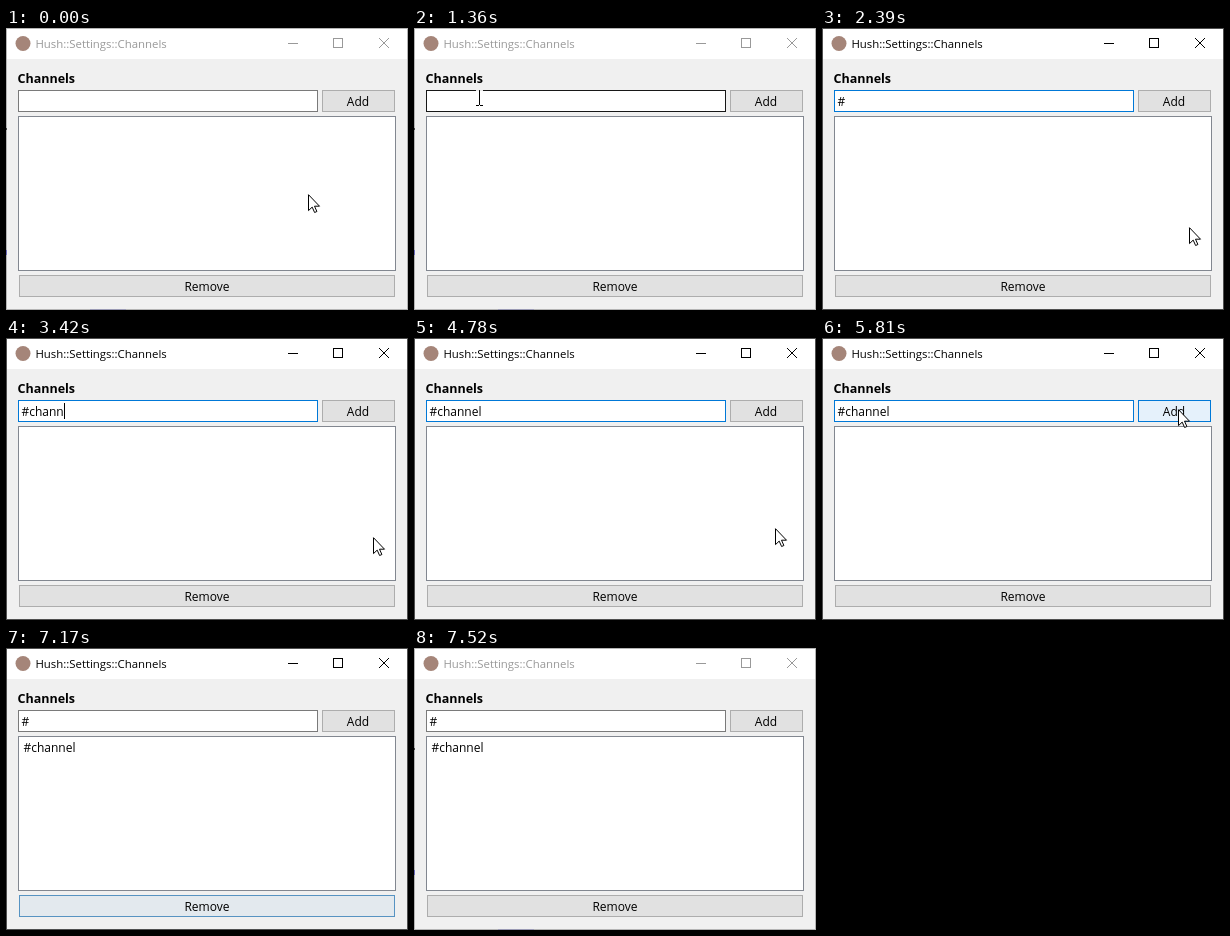
An HTML page for the animation above (7870 ms loop, 402 by 282 pixels).

```html
<!DOCTYPE html>
<html lang="en">
<head>
<meta charset="utf-8">
<title>Channel settings</title>
<style>
  html, body { margin: 0; width: 100%; height: 100%; overflow: hidden; background: #f0f0f0; }
  svg { display: block; isolation: isolate; font: 12px "Open Sans", sans-serif; }
  rect, .glyphs { shape-rendering: crispEdges; }
  .heading { font-size: 12.5px; font-weight: 700; }
  .title { font-size: 11.4px; }
  .center { text-anchor: middle; }
  #beam { mix-blend-mode: difference; fill: #fff; }
</style>
</head>
<body>
<svg width="402" height="282" viewBox="0 0 402 282">
  <rect width="402" height="282" fill="#f0f0f0"/>
  <rect width="402" height="31" fill="#fff"/>
  <rect id="frame" x=".5" y=".5" width="401" height="281" fill="none"/>
  <g id="backdrop">
    <rect y="100" width="1" height="2" fill="#444"/>
    <rect y="222" width="1" height="5" fill="#6a6ab8"/>
    <rect x="84" y="281" width="36" height="1" fill="#9a9ab4"/>
  </g>

  <circle cx="17" cy="15.5" r="7.5" fill="#a58579"/>
  <text id="title" class="title" x="29.4" y="20">Hush::Settings::Channels</text>
  <g id="controls" fill="none">
    <path class="glyphs" d="M282 15.5h10M327.5 10.5h9v9h-9z"/>
    <path d="M373 10l10 10M383 10l-10 10"/>
  </g>

  <text class="heading" x="11.5" y="55">Channels</text>
  <rect id="field" x="12.5" y="62.5" width="299" height="21" fill="#fff"/>
  <text id="entry" x="15.5" y="78"></text>
  <rect id="caret" y="65" width="1" height="16"/>
  <rect id="add" x="316.5" y="62.5" width="72" height="21"/>
  <text class="center" x="352" y="78">Add</text>
  <rect x="12.5" y="88.5" width="377" height="154" fill="#fff" stroke="#828790"/>
  <text id="item" x="17.5" y="104">#channel</text>
  <rect id="remove" x="13.5" y="247.5" width="375" height="21"/>
  <text class="center" x="201" y="263">Remove</text>

  <path id="arrow" d="M.5 .7V16.6L4.2 13.1L6.6 18.5L8.9 17.5L6.5 12.2H11.5Z" fill="#fff" stroke="#000"/>
  <g id="beam">
    <rect x="-3" width="3" height="1"/>
    <rect x="1" width="3" height="1"/>
    <rect y="1" width="1" height="14"/>
    <rect x="-3" y="15" width="3" height="1"/>
    <rect x="1" y="15" width="3" height="1"/>
  </g>
</svg>
<script>
const LOOP = 7870;
const WORD = "#channel";
// Caret position by number of typed characters
const CARET_X = { 1: 24, 3: 37, 6: 58, 7: 65, 8: 68 };

const NORMAL = ["#e1e1e1", "#adadad"];
const FADING = ["#e3e9ee", "#5793c2"];
const HOVER = ["#e5f1fb", "#0078d7"];

// Each step lists only what changes at that time
const steps = [
  [0, { active: false, field: "#7a7a7a", typed: 0, caret: false, item: false,
        add: NORMAL, remove: NORMAL, arrow: [302, 166], beam: null }],
  [680, { arrow: [225, 138] }],
  [1010, { arrow: null, beam: [85, 70], field: "#484848" }],
  [1360, { beam: [65, 62], field: "#171717" }],
  [1690, { active: true, field: "#0b4877", typed: 1, caret: true }],
  [2040, { beam: null, arrow: [350, 188], field: "#0078d7" }],
  [2390, { arrow: [367, 199], caret: false }],
  [2720, { caret: true }],
  [3070, { typed: 3 }],
  [3420, { typed: 6 }],
  [3750, { typed: 7 }],
  [4100, { typed: 8 }],
  [4430, { arrow: [367, 200] }],
  [4780, { arrow: [361, 190], caret: false }],
  [5130, { arrow: [349, 152] }],
  [5460, { arrow: [355, 76], caret: true, add: FADING }],
  [5810, { arrow: [356, 71], caret: false, add: HOVER }],
  [6160, { typed: 1, item: true, field: "#7a7a7a" }],
  [6490, { arrow: [356, 72] }],
  [6840, { arrow: [354, 178], add: NORMAL }],
  [7170, { arrow: null, remove: FADING }],
  [7520, { active: false, remove: NORMAL }],
];

const el = id => document.getElementById(id);
const set = (id, attrs) => {
  for (const name in attrs) el(id).setAttribute(name, attrs[name]);
};
const show = (id, visible) => set(id, { visibility: visible ? "visible" : "hidden" });
const paint = (id, [fill, stroke]) => set(id, { fill, stroke });
const place = (id, point) => {
  show(id, point);
  if (point) set(id, { transform: `translate(${point})` });
};

function draw(time) {
  const past = steps.filter(([start]) => start <= time);
  const s = Object.assign({}, ...past.map(([, change]) => change));
  set("frame", { stroke: s.active ? "#505050" : "#b4b4b4" });
  show("backdrop", !s.active);
  set("title", { fill: s.active ? "#000" : "#999" });
  set("controls", { stroke: s.active ? "#000" : "#999" });
  set("field", { stroke: s.field });
  el("entry").textContent = WORD.slice(0, s.typed);
  set("caret", { x: CARET_X[s.typed] || 16 });
  show("caret", s.caret);
  show("item", s.item);
  paint("add", s.add);
  paint("remove", s.remove);
  place("arrow", s.arrow);
  place("beam", s.beam);
}

const begin = performance.now();
function tick() {
  draw((performance.now() - begin) % LOOP);
  requestAnimationFrame(tick);
}
tick();
</script>
</body>
</html>
```
